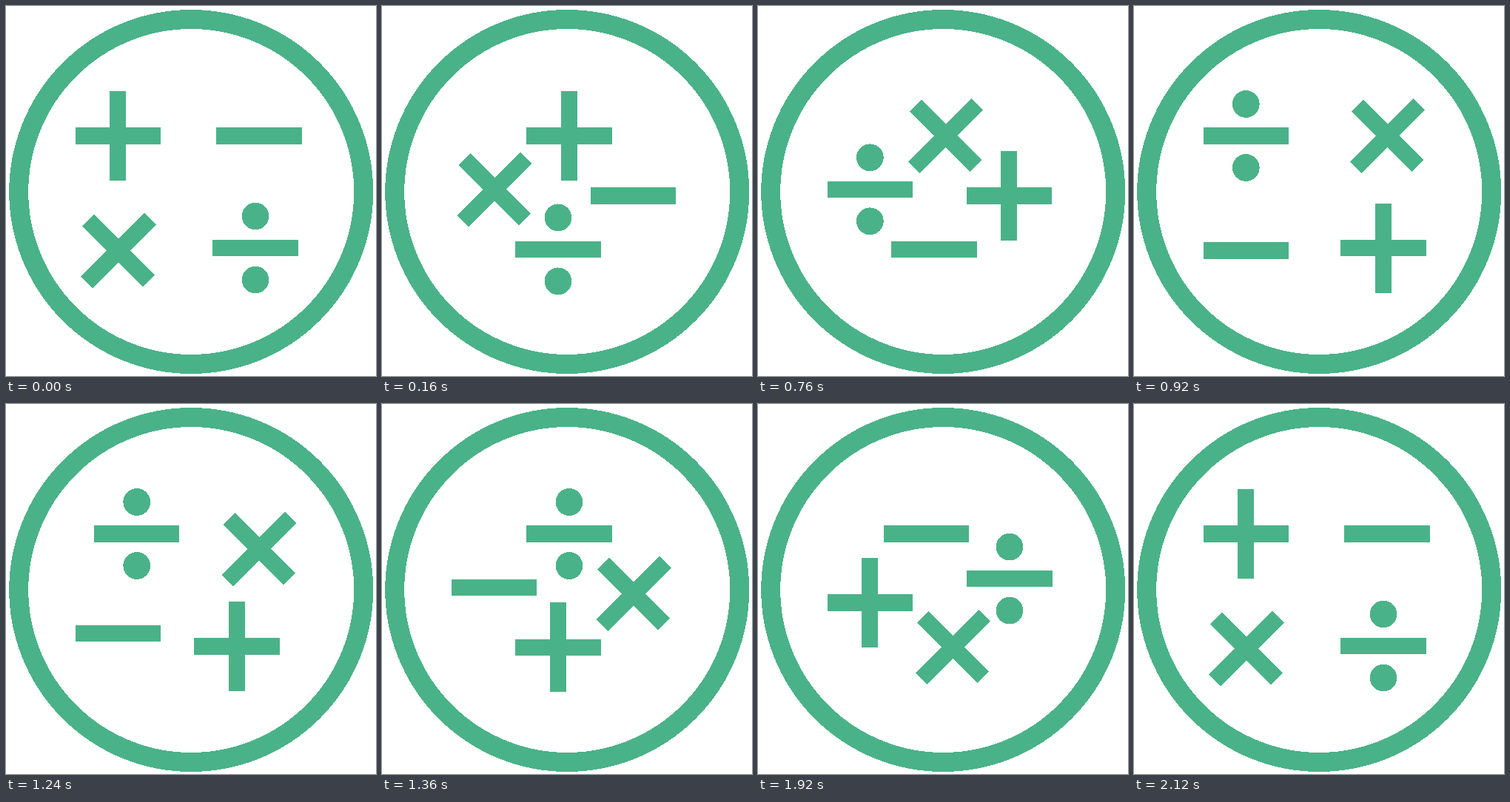
These frames come from a looping animation (500x500 px, 2440 ms). An HTML page:

```html
<!DOCTYPE html>
<html lang="en">
<head>
<meta charset="utf-8">
<style>
  html, body { margin: 0; height: 100%; overflow: hidden; background: #fff; }
  svg { display: block; width: 100vw; height: 100vh; }
</style>
</head>
<body>
<svg viewBox="0 0 500 500" fill="#4ab288" shape-rendering="crispEdges">
  <defs>
    <rect id="bar" x="-57.75" y="-11.25" width="115.5" height="22.5"/>
    <g id="cross">
      <use href="#bar"/>
      <rect x="-11.1" y="-60.5" width="22.2" height="121"/>
    </g>
  </defs>
  <circle cx="250.25" cy="251" r="233" fill="none" stroke="#4ab288" stroke-width="26"/>
  <g class="sign"><use href="#cross"/></g>
  <g class="sign"><use href="#bar"/></g>
  <g class="sign">
    <use href="#bar"/>
    <circle cy="-43" r="18.4"/>
    <circle cy="43" r="18.4"/>
  </g>
  <g class="sign"><use href="#cross" transform="translate(.75) rotate(45)"/></g>
</svg>
<script>
  const LOOP = 2440, TICK = 40, TURN = 600, MOVE = 300;
  // Resting places, clockwise from top left
  const corners = [[151.3, 175.5], [342, 175.5], [337, 327], [151.3, 330.5]];
  const signs = document.querySelectorAll('.sign');

  function draw(now) {
    const t = Math.floor(now % LOOP / TICK) * TICK;
    const turn = Math.min(3, Math.floor(t / TURN));
    const p = Math.min(1, (t - turn * TURN) / MOVE);
    signs.forEach((sign, i) => {
      const from = corners[(i + turn) % 4], to = corners[(i + turn + 1) % 4];
      const [x, y] = from.map((v, k) => v + (to[k] - v) * p);
      sign.setAttribute('transform', `translate(${x} ${y})`);
    });
  }

  let start;
  function frame(now) {
    start ??= now;
    draw(now - start);
    requestAnimationFrame(frame);
  }
  draw(0);
  requestAnimationFrame(frame);
</script>
</body>
</html>
```
